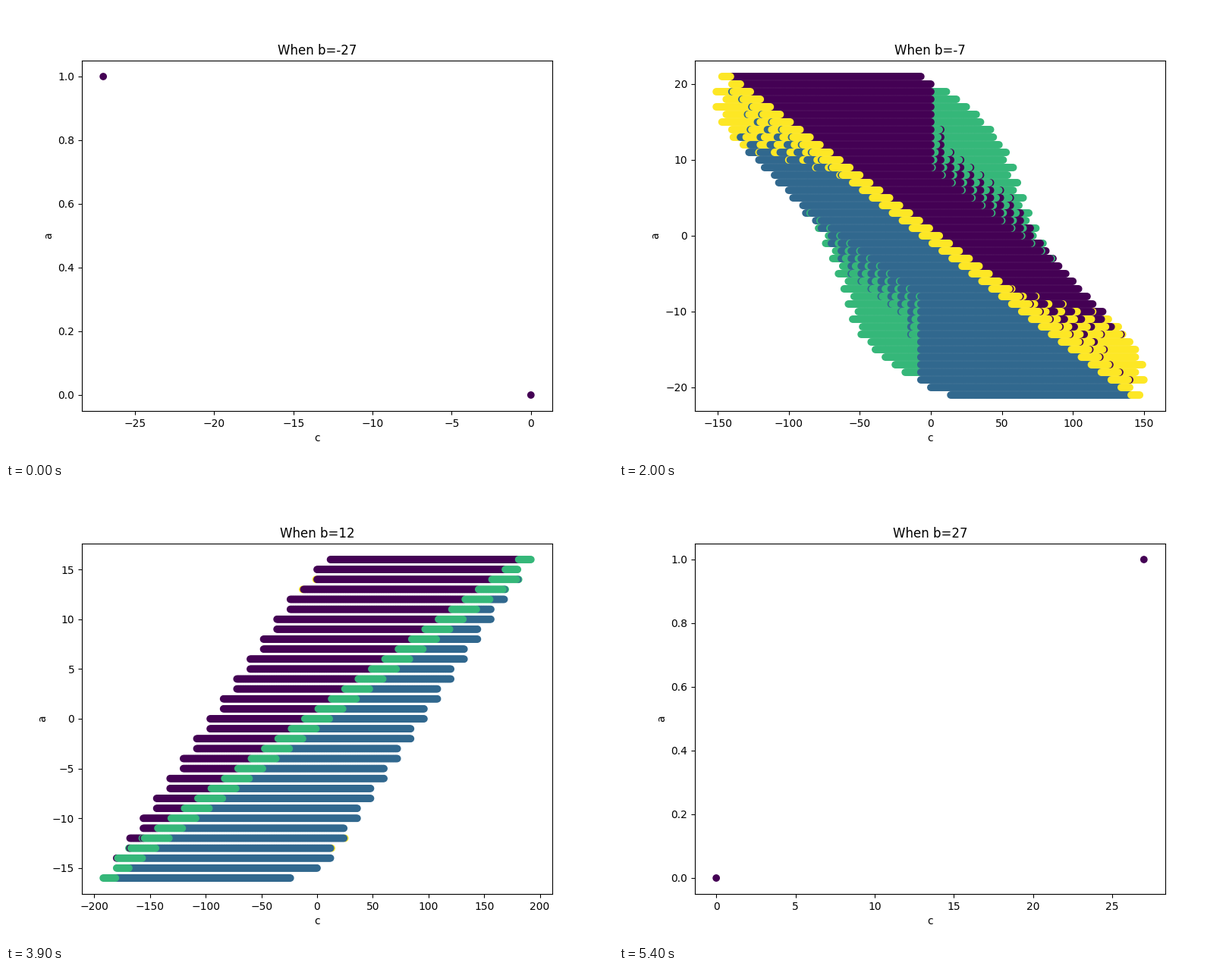
A matplotlib script for the animation above (5.5 s loop, 800 by 600 pixels).

```python
import matplotlib.pyplot as plt
from matplotlib.animation import FuncAnimation

# Points are elements (a, b, c) of the discrete Heisenberg group, found by a
# breadth-first search and coloured by the generator that first reached them.
RADIUS = 28
LAST_BRANCH = (-2, 1, -1)  # the outermost shell stops before this branch
B_MAX = 27


def neighbours(a, b, c):
    return (a + 1, b, c), (a - 1, b, c), (a, b + 1, c + a), (a, b - 1, c - a)


def search():
    """Return {b: [(c, a, generator), ...]} in the order of discovery."""
    start = (0, 0, 0)
    seen = {start}
    slices = {b: [] for b in range(-RADIUS, RADIUS + 1)}
    slices[0].append((0, 0, 0))
    level, cut = [start], None
    for radius in range(1, RADIUS + 1):
        if radius == RADIUS:
            level = level[:cut]
        shell, next_cut = [], None
        for i, node in enumerate(level):
            if i == cut:
                next_cut = len(shell)
            for gen, new in enumerate(neighbours(*node)):
                if new not in seen:
                    seen.add(new)
                    shell.append(new)
                    a, b, c = new
                    slices[b].append((c, a, gen))
        if radius == 3:
            next_cut = shell.index(LAST_BRANCH)
        level, cut = shell, next_cut
    return slices


slices = search()
fig, ax = plt.subplots(figsize=(8, 6), dpi=100)


def draw(frame):
    b = frame - B_MAX
    ax.clear()
    # Elements close to the identity lie on top.
    c, a, gen = zip(*reversed(slices[b]))
    ax.scatter(c, a, c=gen, cmap="viridis")
    ax.set_title(f"When b={b}")
    ax.set_xlabel("c")
    ax.set_ylabel("a")


anim = FuncAnimation(fig, draw, frames=2 * B_MAX + 1, interval=100,
                     repeat=True, repeat_delay=0)
plt.show()
```
